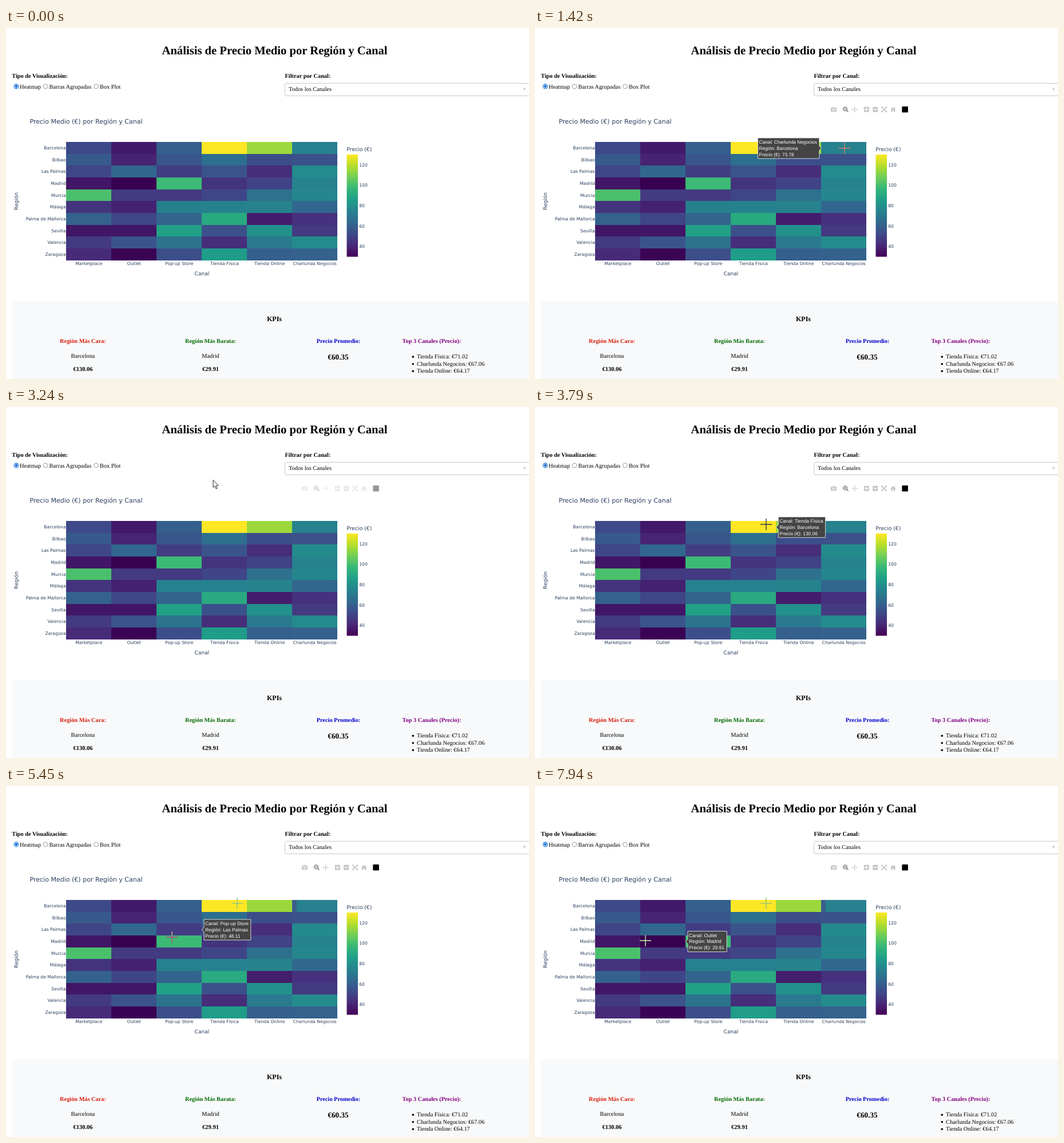
An HTML page for the animation above (8000 ms loop, 914 px wide and 613 px high).

```html
<!DOCTYPE html>
<html lang="es">
<head>
<meta charset="utf-8">
<title>Análisis de Precio Medio</title>
<style>
  html, body { margin: 0; width: 100%; height: 100%; overflow: hidden; background: #fff; }
  svg { display: block; width: 914px; height: 613px; }
  text { text-rendering: geometricPrecision; white-space: pre; }
  .serif { font-family: "Liberation Serif", "Times New Roman", serif; fill: #000; }
  .plot { font-family: "DejaVu Sans", Verdana, sans-serif; fill: #2a3f5f; }
  .tip { font-family: "Liberation Sans", Arial, sans-serif; fill: #fff; }
  .bold { font-weight: bold; }
  .crisp { shape-rendering: crispEdges; }
  .invert { mix-blend-mode: difference; }
</style>
</head>
<body>
<svg id="stage" viewBox="0 0 914 613" xmlns="http://www.w3.org/2000/svg"></svg>
<script>
const NS = 'http://www.w3.org/2000/svg';
const stage = document.getElementById('stage');
const BODY = 10.32, TICK = 7.74;

function add(tag, attrs, parent = stage) {
  const el = document.createElementNS(NS, tag);
  for (const k in attrs) el.setAttribute(k, attrs[k]);
  parent.appendChild(el);
  return el;
}
function text(str, x, y, size, cls, extra = {}, parent = stage) {
  const el = add('text', { x, y, 'font-size': size, class: cls, ...extra }, parent);
  el.textContent = str;
  return el;
}
const MID = { 'text-anchor': 'middle' }, END = { 'text-anchor': 'end' };

// Header and controls
text('Análisis de Precio Medio por Región y Canal', 469.5, 46, 20.64, 'serif bold', MID);
text('Tipo de Visualización:', 10.2, 86.5, BODY, 'serif bold');
text('Filtrar por Canal:', 487.5, 86.5, BODY, 'serif bold');
[['Heatmap', 18, 24], ['Barras Agrupadas', 69, 75.6], ['Box Plot', 157.5, 164]].forEach(([label, cx, x], i) => {
  add('circle', { cx, cy: 102, r: 3.9, fill: '#fff', stroke: i ? '#808080' : '#0f6fd6', 'stroke-width': i ? 0.8 : 1.1 });
  if (!i) add('circle', { cx, cy: 102, r: 2.4, fill: '#0f6fd6' });
  text(label, x, 106, BODY, 'serif');
});
add('rect', { x: 487.5, y: 96.5, width: 440, height: 22, rx: 2.6, fill: '#fff', stroke: '#c8c8c8' });
text('Todos los Canales', 494, 110, BODY, 'serif');
text('×', 906, 110, 11, 'serif', { ...MID, style: 'fill:#999' });

// Heatmap
const channels = ['Marketplace', 'Outlet', 'Pop-up Store', 'Tienda Física', 'Tienda Online', 'Charlunda Negocios'];
const regions = ['Barcelona', 'Bilbao', 'Las Palmas', 'Madrid', 'Murcia', 'Málaga', 'Palma de Mallorca', 'Sevilla', 'Valencia', 'Zaragoza'];
const prices = [
  [52, 37, 60, 130.06, 115, 73.78],
  [58, 40, 57, 66, 54, 55],
  [51, 63, 48.11, 56, 43, 78],
  [36, 29.91, 98.07, 45, 50, 75],
  [101, 47, 47, 51, 67, 76],
  [45, 39, 74, 74, 75, 63],
  [61, 51, 62, 91, 38, 44],
  [36, 36, 87, 55, 80, 47],
  [47, 56, 68, 43, 71, 78],
  [42, 31, 54, 85, 60, 61]
];
const MIN = 29.91, MAX = 130.06;
const viridis = ['#440154', '#482878', '#3e4989', '#31688e', '#26828e', '#1f9e89', '#35b779', '#6ece58', '#b5de2b', '#fde725'];
const cellScale = ['#380050', ...viridis.slice(1)];
const rgb = hex => [1, 3, 5].map(i => parseInt(hex.slice(i, i + 2), 16));
function shade(v) {
  const p = (v - MIN) / (MAX - MIN) * 9, i = Math.min(8, Math.floor(p));
  const a = rgb(cellScale[i]), b = rgb(cellScale[i + 1]);
  return `rgb(${a.map((c, k) => Math.round(c + (b[k] - c) * (p - i)))})`;
}
const X0 = 105.4, Y0 = 199, CW = 78.97, RH = 20.65;

text('Precio Medio (€) por Región y Canal', 41.5, 166.6, 11.04, 'plot');
const heat = add('g', { class: 'crisp' });
prices.forEach((row, r) => {
  row.forEach((v, c) => {
    const x = Math.round(X0 + c * CW), y = Math.round(Y0 + r * RH);
    add('rect', {
      x, y, width: Math.round(X0 + (c + 1) * CW) - x,
      height: Math.round(Y0 + (r + 1) * RH) - y, fill: shade(v)
    }, heat);
  });
  text(regions[r], 104.6, Y0 + (r + 0.5) * RH + 2.8, 7.68, 'plot', END);
});
channels.forEach((name, c) => text(name, X0 + (c + 0.5) * CW, 413.8, c === 5 ? 7.6 : TICK, 'plot', MID));
text('Canal', 342.4, 432.2, 9.03, 'plot', MID);
text('Región', 0, 0, 9.03, 'plot', { ...MID, transform: 'translate(21 302.5) rotate(-90)' });

// Colour bar
const grad = add('linearGradient', { id: 'scale', x1: 0, y1: 1, x2: 0, y2: 0 }, add('defs', {}));
viridis.forEach((c, i) => add('stop', { offset: i / 9, 'stop-color': c }, grad));
add('rect', { x: 595.5, y: 221, width: 19.5, height: 178.5, fill: 'url(#scale)' });
text('Precio (€)', 595.3, 214.6, 9.25, 'plot');
for (let v = 40; v <= 120; v += 20) {
  text(v, 617.2, 399.5 - (v - MIN) / (MAX - MIN) * 178.5 + 2.8, TICK, 'plot');
}

// Figures
add('rect', { x: 10, y: 477, width: 904, height: 136, fill: '#f8f9fa' });
text('KPIs', 469, 512.3, 12.07, 'serif bold', MID);
[['Región Más Cara:', 134.5, '#d81e0c'], ['Región Más Barata:', 357.5, '#006a00'],
 ['Precio Promedio:', 581, '#0000cd'], ['Top 3 Canales (Precio):', 744, '#800080']].forEach(([s, x, c]) =>
  text(s, x, 550.2, BODY, 'serif bold', { ...MID, style: `fill:${c}` }));
[['Barcelona', '€130.06', 134.5], ['Madrid', '€29.91', 357.5]].forEach(([name, price, x]) => {
  text(name, x, 576.2, BODY, 'serif', MID);
  text(price, x, 598.8, 10.5, 'serif bold', MID);
});
text('€60.35', 580.5, 578.6, 13.2, 'serif bold', MID);
['Tienda Física: €71.02', 'Charlunda Negocios: €67.06', 'Tienda Online: €64.17'].forEach((s, i) => {
  const y = 577 + i * 12.5;
  add('circle', { cx: 711.3, cy: y - 2.8, r: 1.8 });
  text(s, 718, y, BODY, 'serif');
});

// Toolbar
const bar = add('g', {});
const icons = [
  [522, 'M0 2h2.6l1-1.4h2.8l1 1.4H10v7H0ZM5 3.2a2.2 2.2 0 1 0 .01 0ZM5 4.3a1.1 1.1 0 1 1-.01 0Z'],
  [543, 'M4 0a4 4 0 1 0 2.3 7.3L9 10l1-1-2.7-2.7A4 4 0 0 0 4 0ZM4 1.3a2.7 2.7 0 1 1-.01 0ZM3.5 2.3h1v1.2h1.2v1H4.5v1.2h-1V4.5H2.3v-1h1.2Z'],
  [558.6, 'M5 0 6.7 2H5.5v2.5H8V3.3L10 5 8 6.7V5.5H5.5V8h1.2L5 10 3.3 8h1.2V5.5H2v1.2L0 5l2-1.7v1.2h2.5V2H3.3Z'],
  [579.3, 'M.5.5h9v9h-9ZM4.3 2.3v2h-2v1.4h2v2h1.4v-2h2V4.3h-2v-2Z'],
  [594.7, 'M.5.5h9v9h-9ZM2.3 4.3v1.4h5.4V4.3Z'],
  [610.2, 'M0 0h3L2.2 .9 5 3.8 7.8.9 7 0h3v3l-.9-.8L6.2 5l2.9 2.8L10 7v3H7l.8-.9L5 6.2 2.2 9.1l.8.9H0V7l.9.8L3.8 5 .9 2.2 0 3Z'],
  [625.8, 'M5 .6 10 5.2H8.6v4.3H6V6.5H4v3H1.4V5.2H0ZM7.4 1h1.2v2L7.4 2Z']
];
icons.forEach(([cx, d], i) => add('path', {
  d, transform: `translate(${cx - 5} 137.3)`, 'fill-rule': 'evenodd', fill: i === 1 ? '#747474' : '#c7c7c7'
}, bar));
add('rect', { x: 641.3, y: 137, width: 10.6, height: 10.6, rx: 1.4, fill: '#000' }, bar);

// Traces that stay on the chart after the pointer has left
const PLUS = 'M-10 0H10M0-10V10';
const trace = add('g', {});
add('rect', { x: 500, y: 199, width: 8, height: 21, fill: '#3a608d', class: 'crisp' }, trace);
add('path', { d: PLUS, transform: 'translate(404 205)', stroke: '#98c878', 'stroke-width': 1.6 }, trace);

// Pointer shapes
const cross = add('path', { d: PLUS, 'stroke-width': 1.4, fill: 'none' });

// Tooltips: channel, region, price, left, width, arrow height, pointing right
const tips = [
  [5, 0, '73.78', 389.4, 107.4, 210, true],
  [3, 0, '130.06', 425.3, 82.2, 210],
  [2, 2, '48.11', 346, 81.8, 251],
  [2, 3, '98.07', 346, 81.8, 271.6],
  [1, 3, '29.91', 267, 68.2, 271.6]
].map(([c, r, price, x, w, y, right]) => {
  const g = add('g', {}), t = y - 18, b = y + 18;
  const point = right ? `M${x} ${t}H${x + w}V${y - 4}l3.6 4l-3.6 4V${b}H${x}Z`
                      : `M${x + w} ${t}H${x}V${y - 4}l-3.8 4l3.8 4V${b}H${x + w}Z`;
  add('path', { d: point, fill: '#444', stroke: '#e6e6e6', 'stroke-width': 0.9 }, g);
  [`Canal: ${channels[c]}`, `Región: ${regions[r]}`, `Precio (€): ${price}`].forEach((s, i) =>
    text(s, x + 2, y - 7.9 + i * 10.75, c === 5 ? 8.3 : 8.39, 'tip', {}, g));
  return g;
});
const arrow = add('path', {
  d: 'M0 0V13.2L3 10.5 5.1 15.4 7.2 14.5 5.1 9.7H9.2Z', fill: '#fff', stroke: '#111', 'stroke-width': 0.9
});

// time, pointer, x, y, toolbar opacity, tooltip
const LOOP = 8000;
const steps = [
  [0, '', 0, 0, 0, -1],
  [430, 'arrow', 885, 588, 0, -1],
  [540, 'arrow', 835, 520, 0, -1],
  [650, 'arrow', 760, 425, 0, -1],
  [770, 'arrow', 680, 335, 0, -1],
  [880, 'arrow', 610, 265, 0.25, -1],
  [990, 'cross', 555, 222, 0.65, -1],
  [1100, 'cross', 524, 205, 0.95, -1],
  [1220, 'cross', 511, 200, 1, -1],
  [1340, 'cross', 532, 206, 1, 0],
  [1420, 'cross', 541, 210, 1, 0],
  [2910, 'arrow', 500, 190, 1, -1],
  [3020, 'arrow', 440, 160, 1, -1],
  [3130, 'arrow', 385, 134, 0.85, -1],
  [3240, 'arrow', 362, 127.5, 0.4, -1],
  [3360, 'arrow', 362, 125, 0.12, -1],
  [3470, 'arrow', 372, 150, 0.3, -1],
  [3570, 'arrow', 392, 184, 0.7, -1],
  [3680, 'dark', 403, 201, 1, -1],
  [3790, 'dark', 404, 205, 1, 1],
  [5000, 'cross', 315, 199, 1, -1],
  [5140, 'cross', 290, 224, 1, -1],
  [5240, 'cross', 277, 245, 1, -1],
  [5340, 'cross', 282, 256, 1, 2],
  [5450, 'cross', 290, 264, 1, 2],
  [5560, 'cross', 294, 268, 1, 3],
  [5680, 'cross', 296, 271, 1, 3],
  [5790, 'cross', 296, 272, 1, 3],
  [6790, 'cross', 280, 272, 1, 3],
  [6900, 'cross', 256, 271, 1, 4],
  [7010, 'cross', 245, 271, 1, 4],
  [7700, 'cross', 226, 270, 1, 4],
  [7820, 'cross', 203, 270, 1, 4],
  [7940, 'cross', 193, 270, 1, 4]
];
const show = (el, on) => { el.style.display = on ? '' : 'none'; };

function draw(now) {
  const t = now % LOOP;
  const [, kind, x, y, opacity, tip] = steps.findLast(s => s[0] <= t);
  const place = `translate(${x} ${y})`;
  const isCross = kind === 'cross' || kind === 'dark';
  show(arrow, kind === 'arrow');
  show(cross, isCross);
  arrow.setAttribute('transform', place);
  cross.setAttribute('transform', place);
  cross.setAttribute('class', kind === 'cross' ? 'invert' : '');
  cross.setAttribute('stroke', kind === 'dark' ? '#2c3a4e' : '#fff');
  bar.setAttribute('opacity', opacity);
  tips.forEach((g, i) => show(g, i === tip));
  show(trace, t >= 5000);
}

const start = performance.now();
function tick() {
  draw(performance.now() - start);
  requestAnimationFrame(tick);
}
tick();
</script>
</body>
</html>
```
